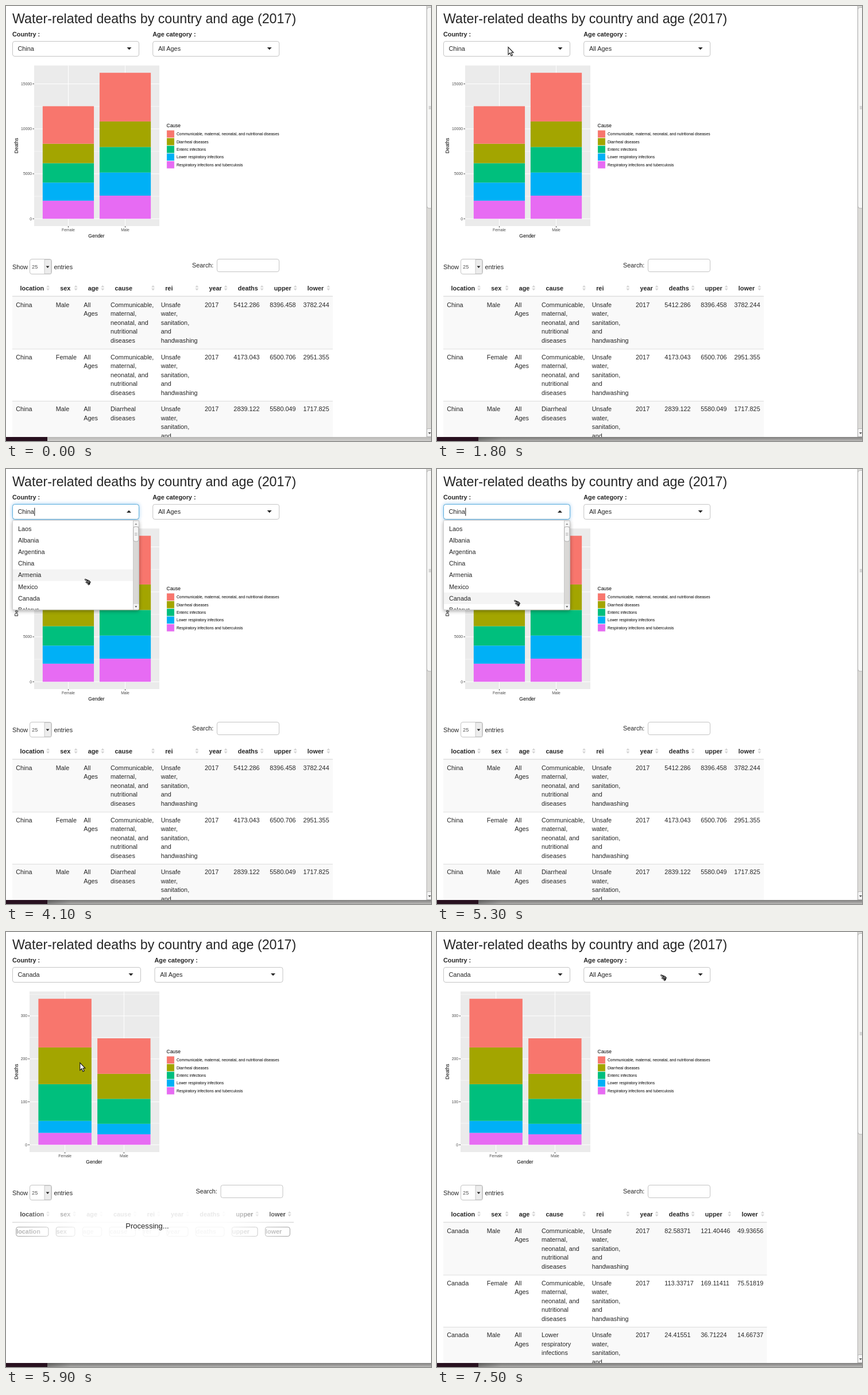
These frames come from a looping animation (740x757 px, 8000 ms). An HTML page:

```html
<!DOCTYPE html>
<html lang="en">
<head>
<meta charset="utf-8">
<title>Water-related deaths</title>
<style>
  html, body { margin: 0; width: 100%; height: 100%; overflow: hidden; background: #fff; }
  svg { display: block; width: 740px; height: 757px; font: 10.85px "Liberation Sans", Arial, sans-serif; }
  text { white-space: pre; }
</style>
</head>
<body>
<svg id="stage" viewBox="0 0 740 757"></svg>
<script>
const LOOP = 8000, STEP = 100;
const ENTER = 500, HOVER = 1800, OPEN = 1900, PICKED = 5600, LOADING = 5900, LOADED = 6000;
const INK = '#262626', FONT = '10.85px "Liberation Sans", Arial, sans-serif';
const CAUSES = [
  ['Communicable, maternal, neonatal, and nutritional diseases', '#F8766D'],
  ['Diarrheal diseases', '#A3A500'],
  ['Enteric infections', '#00BF7D'],
  ['Lower respiratory infections', '#00B0F6'],
  ['Respiratory infections and tuberculosis', '#E76BF3']
];
const OPTIONS = ['Laos', 'Albania', 'Argentina', 'China', 'Armenia', 'Mexico', 'Canada', 'Belarus'];
const ROW_TOP = 94, ROW_H = 20.15;

const text = (x, y, s, attrs = '') => `<text x="${x}" y="${y}" fill="${INK}" ${attrs}>${s}</text>`;
const bold = (x, y, s, attrs = '') => text(x, y, s, 'font-weight="700" ' + attrs);
const label = (x, y, s, size, attrs = '') => `<text x="${x}" y="${y}" font-size="${size}" ${attrs}>${s}</text>`;
const rect = (x, y, w, h, fill, attrs = '') =>
  `<rect x="${x}" y="${y}" width="${w}" height="${h}" fill="${fill}" ${attrs}/>`;
const path = (d, fill, attrs = '') => `<path d="${d}" fill="${fill}" ${attrs}/>`;
const stroke = (d, color, width) => path(d, 'none', `stroke="${color}" stroke-width="${width}"`);
const group = (id, body) => `<g id="${id}">${body}</g>`;
const triangle = (x, y, w, h, fill) => path(`M${x - w / 2} ${y}h${w}l${-w / 2} ${h}z`, fill);
const field = (x, y, w, h, color = '#c4c4c4') =>
  rect(x + .5, y + .5, w - 1, h - 1, '#fff', `rx="3.5" stroke="${color}"`);
const grip = (x, y, w) => [-2, 0, 2].map(d => rect(x, y + d, w, .8, '#aaa')).join('');

const pen = document.createElement('canvas').getContext('2d');
function textWidth(s, weight = '') {
  pen.font = `${weight} ${FONT}`;
  return pen.measureText(s).width;
}

function selectors(width, secondX) {
  const box = x => field(x, 61, width, 27) + triangle(x + width - 17.5, 72, 8, 4.3, INK);
  return bold(11, 53, 'Country :') + bold(secondX, 53, 'Age category :') +
    box(11) + box(secondX) + text(secondX + 9.7, 78, 'All Ages');
}

// Each sex is [diarrheal, lower respiratory]; the other causes follow from these two.
function chart(left, tickStep, sexes) {
  const stacks = sexes.map(([d, l]) => [l, l, d, d, d + l]);
  const max = Math.max(...sexes.map(([d, l]) => 3 * (d + l)));
  const top = 103.5, bottom = 383, pad = (bottom - top) / 22, unit = (267 - left) / 2.2;
  const yOf = v => bottom - pad - v / max * (bottom - top - 2 * pad);
  let s = rect(left, top, 267 - left, bottom - top, '#EBEBEB');
  for (let v = 0; yOf(v) > top; v += tickStep / 2) {
    const y = yOf(v), major = v % tickStep === 0;
    s += stroke(`M${left} ${y}H267`, '#fff', major ? 1 : .5);
    if (major) s += stroke(`M${left - 2.5} ${y}h2.5`, '#333', .9) +
      label(left - 4, y + 2.4, v, 6.8, 'fill="#4d4d4d" text-anchor="end"');
  }
  stacks.forEach((stack, i) => {
    const x = left + unit * (i + .6);
    let sum = 0;
    s += stroke(`M${x} ${top}V${bottom}`, '#fff', 1) + stroke(`M${x} ${bottom}v2.5`, '#333', .9) +
      label(x, 392, ['Female', 'Male'][i], 6.8, 'fill="#4d4d4d" text-anchor="middle"');
    stack.forEach((v, k) => {
      sum += v;
      s += rect(x - .45 * unit, yOf(sum), .9 * unit, yOf(sum - v) - yOf(sum), CAUSES[4 - k][1]);
    });
  });
  return s + label((left + 267) / 2 - .5, 403, 'Gender', 8.5, 'text-anchor="middle"');
}

function legend() {
  const keys = CAUSES.map(([name, color], i) => {
    const y = 216 + i * 13.4;
    return rect(279.5, y, 14, 13.4, '#f2f2f2') + rect(280.1, y + .5, 12.8, 12.4, color) +
      label(297, y + 9.2, name, 6.72);
  });
  return label(279.5, 211, 'Cause', 8.5) + keys.join('') +
    label(0, 0, 'Deaths', 8.5, 'text-anchor="middle" transform="translate(20.8 243) rotate(-90)"');
}

function tableControls(shift) {
  return text(11, 457.5, 'Show') + text(83.5, 457.5, 'entries') +
    field(41, 440, 39, 27) + label(45, 457, '25', 9.3, 'fill="#555"') +
    rect(67, 441.5, 11.5, 24.5, '#ececec', 'stroke="#bbb" stroke-width=".7"') + triangle(72.5, 452.5, 6, 3.5, '#222') +
    text(324 + shift, 455, 'Search:') + field(367 + shift, 440, 109, 23);
}

const HEADS = ['location', 'sex', 'age', 'cause', 'rei', 'year', 'deaths', 'upper', 'lower'];
const CELL_PAD = 6.2, HEAD_PAD = 13.6;

// Columns are as wide as their widest cell, as in an HTML table.
function columns(rows) {
  let left = 11;
  return HEADS.map((name, c) => {
    const cells = rows.flatMap(row => row[c]).map(line => textWidth(line) + 2 * CELL_PAD);
    const col = { name, left, right: left + Math.max(textWidth(name, 'bold') + 2 * HEAD_PAD + .8, ...cells) };
    left = col.right;
    return col;
  });
}

function tableHead(cols) {
  const right = cols[cols.length - 1].right;
  return cols.map(col => bold(col.left + HEAD_PAD, 494.5, col.name) +
    triangle(col.right - 7.5, 489.5, 6, -3.6, '#d3d3d3') +
    triangle(col.right - 7.5, 491.6, 6, 3.6, '#d3d3d3')).join('') +
    rect(11, 504.6, right - 11, 1.2, '#d2d2d2');
}

const LONG = ['Communicable,', 'maternal,', 'neonatal, and', 'nutritional', 'diseases'];
const UNSAFE = ['Unsafe', 'water,', 'sanitation,', 'and', 'handwashing'];
function table(place, records) {
  const rows = records.map(([sex, cause, ...values]) =>
    [[place], [sex], ['All', 'Ages'], cause, UNSAFE, ['2017'], ...values.map(v => [v])]);
  const cols = columns(rows), width = cols[8].right - 11, height = 90.7;
  let s = tableHead(cols);
  rows.forEach((row, r) => {
    const top = 505.8 + r * height;
    if (r % 2 === 0) s += rect(11, top, width, height, '#f9f9f9');
    if (r) s += rect(11, top, width, 1, '#ddd');
    row.forEach((lines, c) => lines.forEach((line, i) =>
      s += text(cols[c].left + CELL_PAD, top + 18 + i * 15.56, line)));
  });
  return `<g clip-path="url(#page)">${s}</g>`;
}

function loadingTable() {
  const cols = columns([]);
  const foot = cols.map(({ name, left, right }) =>
    field(left + CELL_PAD, 513, right - left - 2 * CELL_PAD, 17, '#999') +
    label(left + CELL_PAD + 1, 525, name, 10.85, 'fill="#aaa" font-weight="700"')).join('');
  return tableHead(cols) + foot + rect(11, 486, 492, 56, 'url(#veil)') +
    text(246, 516, 'Processing...', 'font-size="13.05" text-anchor="middle"');
}

function pageScrollbar() {
  return rect(732, 0, 8, 750, '#dcdbd8') + rect(732, 0, .8, 750, '#aaa') +
    rect(732.7, 2.5, 14, 349.5, '#f6f6f5', 'rx="4" stroke="#a4a4a4" stroke-width=".8"') + grip(736, 176.5, 4) +
    rect(732.7, 735.5, 14, 14, '#f4f4f4', 'rx="2" stroke="#aaa" stroke-width=".8"') + triangle(737.5, 742, 5, 3, '#555');
}

function desktop() {
  return rect(0, 750, 740, 7, '#d9d8d6') + rect(0, 750, 740, 7, 'url(#shade)', 'opacity=".4"') +
    group('dusk', rect(72, 750, 668, 7, 'url(#edge)') + rect(0, 750, 740, 7, 'url(#shade)', 'opacity=".8"')) +
    rect(0, 750, 72, 7, '#28111f');
}

function dropdown() {
  const options = OPTIONS.map((name, i) => text(21, 107.8 + i * ROW_H, name)).join('');
  return rect(11.5, 61.5, 220, 26, '#fff', 'rx="4" stroke="#5fb0dd" style="filter:drop-shadow(0 0 3px #66afe9b0)"') +
    triangle(214, 76, 8, -4.3, INK) + text(20.5, 78, 'China') +
    group('caret', rect(49.3, 67.5, 1, 14, '#111')) +
    rect(11.5, 89.5, 220, 155.5, '#fff', 'rx="2" stroke="#cfcfcf" style="filter:drop-shadow(0 2px 3px #0005)"') +
    group('hover', rect(12, ROW_TOP, 209, ROW_H, '#f4f4f4')) +
    `<g clip-path="url(#list)">${options}</g>` +
    rect(221.5, 90, 9.5, 154.5, '#d9d8d6', 'stroke="#b5b5b5" stroke-width=".6"') +
    rect(222, 90.5, 9, 9.5, '#f4f4f4', 'rx="1"') + triangle(226.3, 97, 4, -2.5, '#888') +
    rect(221.8, 100.5, 9, 25.5, '#f6f6f6', 'rx="3" stroke="#999" stroke-width=".7"') + grip(224, 113, 4.6) +
    rect(222, 235, 9, 9.5, '#f4f4f4', 'rx="1"') + triangle(226.3, 238.5, 4, 2.5, '#444');
}

function cursors() {
  return group('arrow', path('M.5 .5V13.6L3.5 10.8 5.7 15.7 7.9 14.7 5.8 10H9.6Z', '#fff', 'stroke="#111" stroke-width="1.1"')) +
    group('beam', stroke('M-2 1.5H3M.5 1.5V14M-2 14.5H3', '#111', 1)) +
    group('hand', path('M.8 1.6 2.4 .8 6.3 2.4 9.2 3.4 12.4 7 11 8.6 11 10.2 8.4 12.6 6.2 11 4.8 9 2.6 7.7 2.8 6.2 4.6 6 1.2 3.2Z',
      '#151515', 'stroke="#fff" stroke-width=".5"') + stroke('M1.8 1.8 8.6 8.2M7.4 4.2 10 7.4M4.6 7.3 8 11', '#fff', .8));
}

document.getElementById('stage').innerHTML = `<defs>
  <clipPath id="page"><rect width="740" height="750"/></clipPath>
  <clipPath id="list"><rect x="12" y="90" width="209" height="154.5"/></clipPath>
  <linearGradient id="veil"><stop stop-color="#fff" stop-opacity="0"/><stop offset=".25" stop-color="#fff" stop-opacity=".9"/>
    <stop offset=".75" stop-color="#fff" stop-opacity=".9"/><stop offset="1" stop-color="#fff" stop-opacity="0"/></linearGradient>
  <linearGradient id="edge"><stop stop-opacity=".3"/><stop offset=".06" stop-opacity=".08"/><stop offset="1" stop-opacity="0"/></linearGradient>
  <linearGradient id="shade" x2="0" y2="1"><stop stop-opacity=".38"/><stop offset="1" stop-opacity=".12"/></linearGradient>
  </defs>` +
  rect(0, 0, 740, 757, '#fff') + desktop() +
  text(11, 30, 'Water-related deaths by country and age (2017)', 'font-size="23.25"') + legend() +
  group('wide', selectors(224, 258.5) + tableControls(6.5) + loadingTable()) +
  group('narrow', selectors(221, 255.2) + tableControls(0) + pageScrollbar()) +
  group('china', chart(49, 5000, [[2160, 2013], [2839, 2573]])) +
  group('canada', chart(41, 100, [[85.5, 27.8], [58.2, 24.4]])) +
  group('chinaRows', table('China', [
    ['Male', LONG, '5412.286', '8396.458', '3782.244'],
    ['Female', LONG, '4173.043', '6500.706', '2951.355'],
    ['Male', ['Diarrheal', 'diseases'], '2839.122', '5580.049', '1717.825']])) +
  group('canadaRows', table('Canada', [
    ['Male', LONG, '82.58371', '121.40446', '49.93656'],
    ['Female', LONG, '113.33717', '169.11411', '75.51819'],
    ['Male', ['Lower', 'respiratory', 'infections'], '24.41551', '36.71224', '14.66737']])) +
  group('pickChina', text(20.5, 78, 'China')) + group('pickCanada', text(20.5, 78, 'Canada')) +
  group('dropdown', dropdown()) + cursors();

// The pointer's journey: start, duration, x, y.
const MOVES = [
  [ENTER, 300, 103, 33], [HOVER, 0, 123.5, 71], [2600, 0, 121, 93], [2700, 400, 144, 116],
  [3300, 0, 144, 143], [3400, 300, 142.5, 181], [4100, 0, 135.7, 190], [4400, 200, 135, 202],
  [5300, 0, 133, 227], [PICKED, 0, 128.3, 227], [6300, 200, 203, 173], [6700, 0, 330, 128], [6800, 300, 388, 73]
];

function pointerAt(t) {
  const now = Math.floor(t / STEP) * STEP;
  let x = 81, y = 0;
  for (const [start, duration, toX, toY] of MOVES) {
    if (now < start) break;
    const p = duration ? Math.min(1, (now - start) / duration) : 1, ease = 1 - (1 - p) ** 2;
    x += (toX - x) * ease;
    y += (toY - y) * ease;
  }
  return { x, y };
}

function pointerShape(t) {
  if (t < ENTER) return '';
  if (t >= OPEN && t < PICKED) return t < 2600 ? 'beam' : 'hand';
  return t < 7000 ? 'arrow' : 'hand';
}

const el = id => document.getElementById(id);
const show = (id, on) => el(id).style.display = on ? '' : 'none';
const move = (id, x, y) => el(id).setAttribute('transform', `translate(${x} ${y})`);

function draw(t) {
  const loading = t >= LOADING && t < LOADED;
  show('wide', loading);
  show('narrow', !loading);
  show('china', t < LOADING);
  show('canada', t >= LOADING);
  show('chinaRows', t < LOADING);
  show('canadaRows', t >= LOADED);
  show('pickChina', t < OPEN);
  show('pickCanada', t >= PICKED);
  show('dropdown', t >= OPEN && t < PICKED);
  show('caret', Math.floor((t - OPEN) / 500) % 2 === 0);
  show('dusk', t >= HOVER);

  const { x, y } = pointerAt(t), shape = pointerShape(t);
  for (const id of ['arrow', 'beam', 'hand']) {
    show(id, id === shape);
    move(id, x, y);
  }
  const row = Math.floor((y - ROW_TOP) / ROW_H);
  move('hover', 0, (row < 0 ? OPTIONS.indexOf('China') : row) * ROW_H);
}

function tick() {
  draw(performance.now() % LOOP);
  requestAnimationFrame(tick);
}
tick();
</script>
</body>
</html>
```
